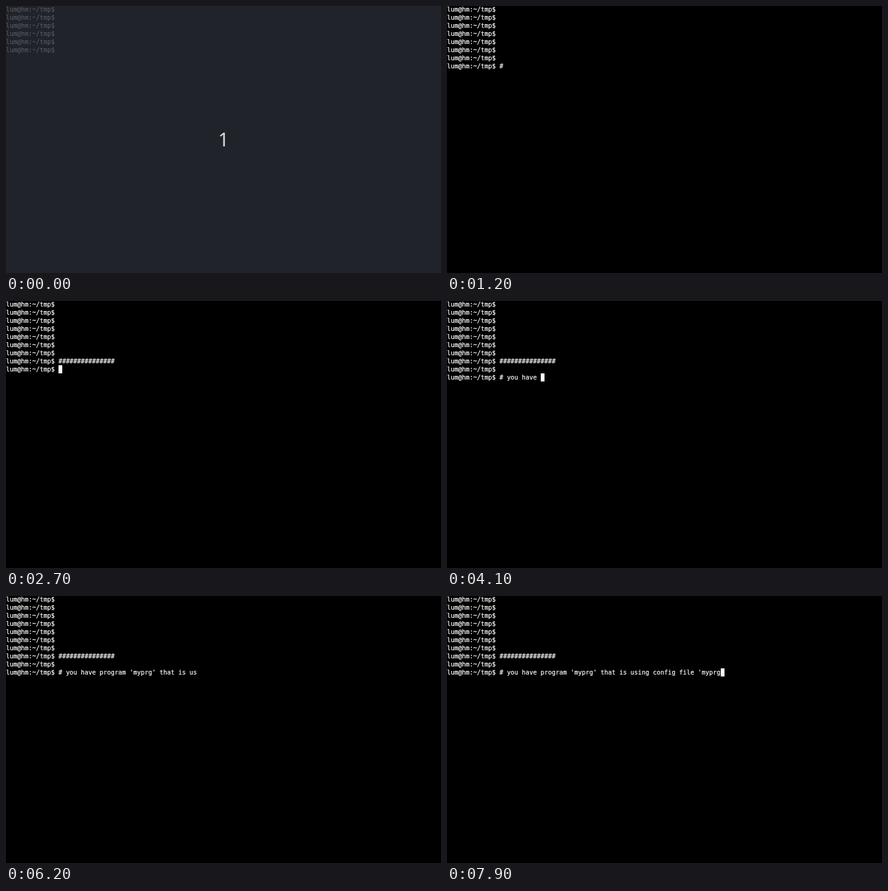
An HTML page for the animation above (8000 ms loop, 696x428 px).

```html
<!DOCTYPE html>
<html lang="en">
<head>
<meta charset="utf-8">
<title>Terminal</title>
<style>
  html, body { margin: 0; width: 100%; height: 100%; overflow: hidden; background: #000; }
  svg { display: block; width: 696px; height: 428px; }
  #rows { font: 9.967px "DejaVu Sans Mono", monospace; fill: #fff; stroke: #fff; stroke-width: .2; white-space: pre; }
  #count { font: 30px "Noto Sans", sans-serif; fill: #d8dade; text-anchor: middle; }
  .dimmed #back { fill: #20232a; }
  .dimmed #rows { fill: #5c5f65; stroke: none; }
  svg:not(.dimmed) #count { visibility: hidden; }
</style>
</head>
<body>
<svg id="stage" viewBox="0 0 696 428">
  <rect id="back" width="696" height="428"/>
  <g id="rows"></g>
  <rect id="cursor" width="6" height="13" fill="#fff"/>
  <text id="count" x="348" y="225">1</text>
</svg>
<script>
const LOOP = 8000, STEP = 100;
const CELL_W = 6, CELL_H = 13;
const RATE = 12.62 / 1000; // characters typed per ms
const BLINK = { start: 300, period: 1200, on: 500 };
const PROMPT = "lum@hm:~/tmp$ ";

const row = (from, text = "") => ({ from, text });
const rows = [
  ...Array.from({ length: 6 }, () => row(0)),
  row(400),
  row(1200, "#".repeat(15)),
  row(2600),
  row(3300, "# you have program 'myprg' that is using config file 'myprg")
];

const byId = id => document.getElementById(id);
const stage = byId("stage"), cursor = byId("cursor");

rows.forEach((r, i) => {
  r.el = document.createElementNS("http://www.w3.org/2000/svg", "text");
  r.el.setAttribute("y", i * CELL_H + 9);
  byId("rows").append(r.el);
});

function content(r, t) {
  if (t < r.from) return "";
  return PROMPT + r.text.slice(0, Math.floor(1 + (t - r.from) * RATE));
}

function cursorOn(t) {
  return t >= BLINK.start && (t - BLINK.start) % BLINK.period < BLINK.on;
}

function draw(time) {
  const t = Math.floor((time % LOOP) / STEP) * STEP;
  rows.forEach((r, i) => {
    const line = content(r, t);
    if (r.el.textContent !== line) r.el.textContent = line;
    if (line) {
      cursor.setAttribute("x", line.length * CELL_W);
      cursor.setAttribute("y", i * CELL_H - 1);
    }
  });
  cursor.setAttribute("visibility", cursorOn(t) ? "visible" : "hidden");
  stage.classList.toggle("dimmed", t < STEP);
}

function tick() {
  draw(performance.now());
  requestAnimationFrame(tick);
}
tick();
</script>
</body>
</html>
```
